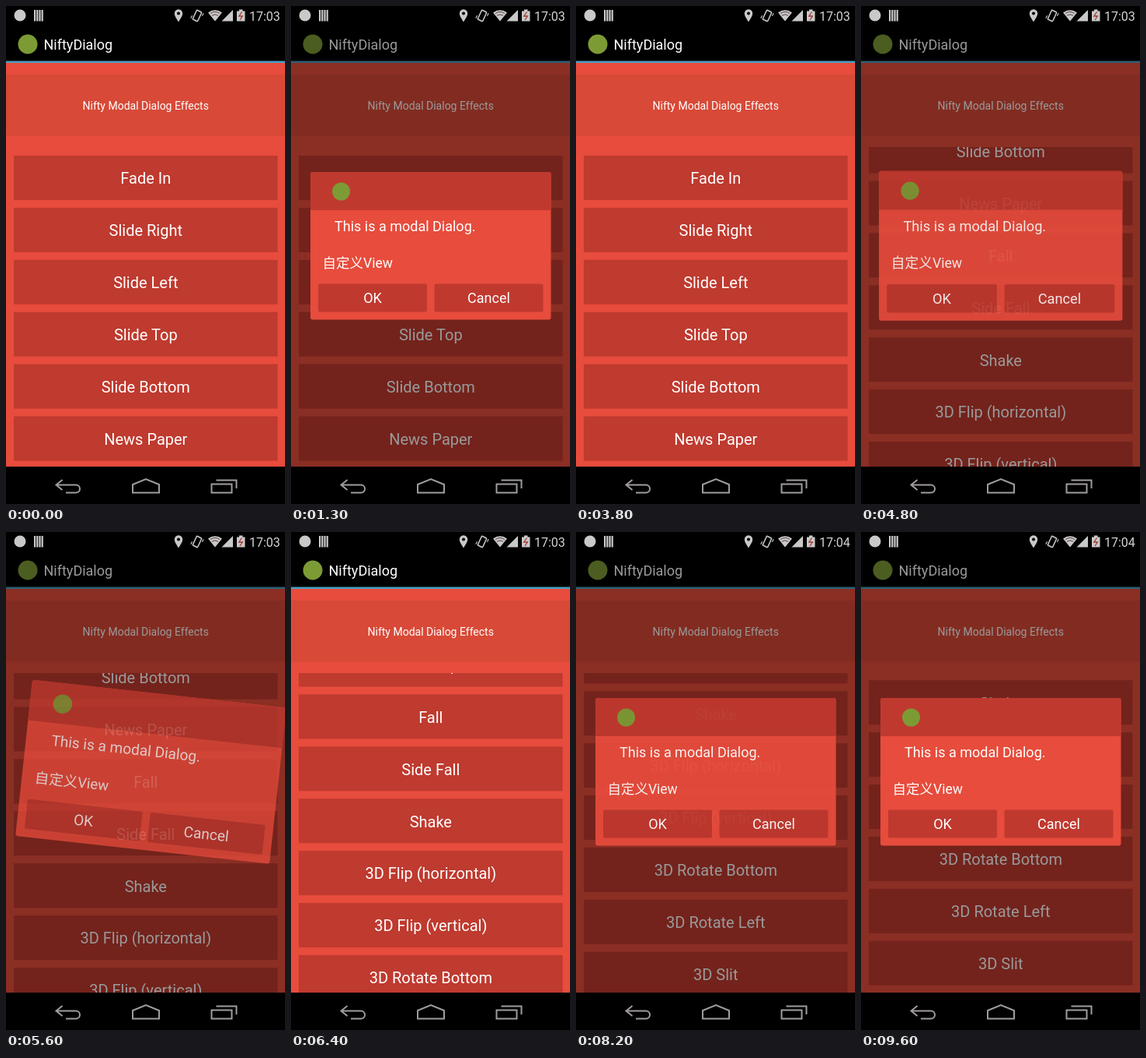
An HTML page that plays this animation: 359x639 px, repeating every 10 s.

```html
<!DOCTYPE html>
<html lang="en">
<head>
<meta charset="utf-8">
<title>Dialog effects</title>
<style>
  html, body { margin: 0; width: 100%; height: 100%; overflow: hidden; background: #000; }
  svg { display: block; width: 359px; height: 639px; }
  text { font-family: Roboto, "Noto Sans CJK SC", "Noto Sans CJK", sans-serif; fill: #fff; }
  .mid { text-anchor: middle; }
  .line { fill: none; stroke: #a09c9b; stroke-width: 2; }
</style>
</head>
<body>
<svg viewBox="0 0 359 639">
  <defs>
    <clipPath id="listClip"><rect x="0" y="181" width="359" height="410"/></clipPath>
    <clipPath id="screenClip"><rect x="0" y="25" width="359" height="566"/></clipPath>
  </defs>
  <rect width="359" height="639" fill="#000"/>

  <!-- page -->
  <rect y="73" width="359" height="518" fill="#e74c3c"/>
  <rect y="70.5" width="359" height="2.5" fill="#4a9ec4"/>
  <rect y="88" width="359" height="78.5" fill="#d84937"/>
  <text class="mid" x="179.7" y="133" font-size="14">Nifty Modal Dialog Effects</text>
  <circle cx="28" cy="49" r="12.5" fill="#7c9b35"/>
  <text x="48.5" y="56" font-size="18">NiftyDialog</text>
  <g clip-path="url(#listClip)"><g id="list"></g></g>

  <rect id="dim" y="25" width="359" height="566" fill="#000"/>

  <!-- dialog -->
  <g clip-path="url(#screenClip)">
    <g id="dialog">
      <rect x="25" y="213" width="309.5" height="189.5" rx="3" fill="#e74c3c"/>
      <path d="M25 262V216a3 3 0 0 1 3-3H331.500a3 3 0 0 1 3 3V262Z" fill="#c0392f"/>
      <circle cx="64.500" cy="238" r="11.5" fill="#7c9b35"/>
      <text x="56" y="289.300" font-size="18">This is a modal Dialog.</text>
      <text x="40.500" y="336" font-size="17.5">自定义View</text>
      <rect x="35" y="356.500" width="140" height="36" rx="2" fill="#c0392f"/>
      <rect x="184.500" y="356.500" width="140" height="36" rx="2" fill="#c0392f"/>
      <text class="mid" x="105" y="381.300" font-size="18">OK</text>
      <text class="mid" x="254.500" y="381.300" font-size="18">Cancel</text>
    </g>
  </g>

  <!-- status bar -->
  <g fill="#c9c9c9">
    <circle cx="18" cy="12" r="7.5"/>
    <path d="M36 5h2.200v14.500h-2.200zM39.200 5h2.200v14.500h-2.200zM42.400 5h2.200v14.500h-2.200zM45.600 5h2.200v14.500h-2.200z"/>
    <path fill-rule="evenodd" d="M222 20.500C218.500 15 216.800 12 216.800 9.500a5.200 5.200 0 0 1 10.400 0C227.200 12 225.500 15 222 20.500ZM222 7.500a2 2 0 1 0 0 4a2 2 0 1 0 0-4Z"/>
    <path d="M260 8.500Q269 2 278 8.500L269 19.500Z"/>
    <path d="M292 5V19.500H277.500Z"/>
    <path d="M297 6.500h3V4.500h4.500v2h3V19.500H297Z"/>
  </g>
  <path d="M263 9.500Q269 5.500 275 9.500M265 12.200Q269 9.500 273 12.200" fill="none" stroke="#5a3f3d" stroke-width="1"/>
  <path d="M303.500 7.500L299.800 13h4.500L301 18" fill="none" stroke="#a5372e" stroke-width="1.300"/>
  <g transform="rotate(25 246 12.500)" fill="none" stroke="#c9c9c9" stroke-width="1.600">
    <rect x="242.500" y="6" width="7" height="13" rx="1"/>
    <path d="M240 15v4M252 6v4" stroke-width="1.200"/>
  </g>
  <text id="clock" x="313" y="18.500" font-size="16" style="fill:#d4d4d4"></text>

  <!-- navigation bar -->
  <g class="line">
    <path d="M72.500 608L64.500 614.500L72.500 621M65 614.500H90a5 5 0 0 1 0 10H77"/>
    <path d="M163 624.500V614L180 607L197 614V624.500Z"/>
    <path d="M264.500 613.500H290.500V624.500H264.500Z"/>
    <path d="M270.500 608.500H296.500V619"/>
  </g>
</svg>
<script>
  const LOOP = 10000, STEP = 100, PITCH = 66.9;
  const CX = 179.75, CY = 307.75;
  const $ = id => document.getElementById(id);
  const list = $("list"), dim = $("dim"), dialog = $("dialog"), clock = $("clock");

  const items = ["Fade In", "Slide Right", "Slide Left", "Slide Top", "Slide Bottom",
    "News Paper", "Fall", "Side Fall", "Shake", "3D Flip (horizontal)",
    "3D Flip (vertical)", "3D Rotate Bottom", "3D Rotate Left", "3D Slit"];

  list.innerHTML = items.map((name, i) => {
    const y = 192 + i * PITCH;
    return `<rect x="10" y="${y}" width="339.5" height="57" fill="#bf3a2f"/>
      <text class="mid" x="179.8" y="${y + 36.3}" font-size="20">${name}</text>`;
  }).join("");

  const move = (x, y) => `translate(${x} ${y})`;
  const about = ops => `${move(CX, CY)} ${ops} ${move(-CX, -CY)}`;
  const turn = deg => Math.cos(deg * Math.PI / 180);

  // Each effect gets the remaining part r, from 1 down to 0.
  const effects = {
    fade: () => "",
    right: r => move(100 * r, 0),
    left: r => move(-100 * r, 0),
    top: r => move(0, -100 * r),
    bottom: r => move(0, 100 * r),
    news: r => about(`rotate(${1080 * r * r}) scale(${1 - 0.9 * r})`),
    fall: r => about(`scale(${1 + r * r})`),
    sideFall: r => move(27 * r, 0) + about(`rotate(${25 * r}) scale(${1 + r * r})`),
    shake: r => move(8 * Math.sin(r * 6 * Math.PI), 0),
    flip: r => about(`scale(${turn(90 * r * r)} 1)`),
    rotateLeft: r => move(-100 * r * r, 0) + about(`scale(${turn(90 * r)} 1)`),
    slit: r => about(`scale(${(1 - r) * turn(90 * r)} ${1 - r})`)
  };

  // opening time, closing time, effect, steps to settle
  const shows = [
    [300, 800, "fade", 2], [1100, 1500, "right", 3], [1700, 2100, "left", 3],
    [2300, 2700, "top", 3], [2900, 3200, "bottom", 3], [3400, 3800, "news", 3],
    [4700, 5300, "fall", 3], [5500, 6000, "sideFall", 4], [7000, 7600, "shake", 3],
    [8100, 8500, "flip", 3], [8800, 9200, "rotateLeft", 3], [9400, LOOP, "slit", 3]
  ];

  // time, list offset
  const scrolls = [[0, 0], [4100, 0], [4500, 302], [6200, 302], [6400, 385], [6600, 430],
    [7600, 430], [7900, 523], [8500, 523], [8700, 537], [LOOP, 537]];

  function offsetAt(t) {
    const i = scrolls.findIndex(k => k[0] > t);
    const [t0, y0] = scrolls[i - 1], [t1, y1] = scrolls[i];
    return y0 + (y1 - y0) * (t - t0) / (t1 - t0);
  }

  function draw(time) {
    const t = Math.floor((time % LOOP) / STEP) * STEP;
    list.setAttribute("transform", move(0, -offsetAt(t)));
    clock.textContent = t < 6500 ? "17:03" : "17:04";

    const show = shows.find(([from, to]) => t >= from && t < to);
    dialog.style.display = show ? "" : "none";
    dim.setAttribute("opacity", show ? (t === show[0] ? 0.25 : 0.4) : 0);
    if (!show) return;

    const [from, , name, steps] = show;
    const left = Math.max(0, 1 - ((t - from) / STEP + 1) / steps);
    const r = left * left;
    const fade = name === "flip" ? r / 2 : name === "shake" ? 0 : r;
    dialog.setAttribute("transform", effects[name](r));
    dialog.setAttribute("opacity", 1 - fade);
  }

  const start = performance.now();
  function tick() {
    draw(performance.now() - start);
    requestAnimationFrame(tick);
  }
  tick();
</script>
</body>
</html>
```
